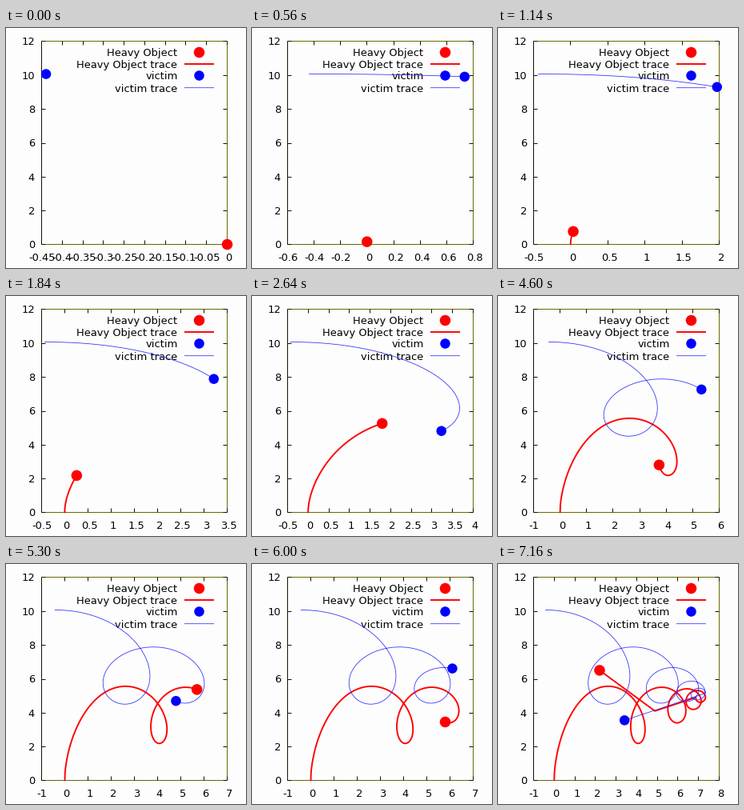
Animation of 300x300 px, one loop 7180 ms. Source, as a matplotlib script:

```python
import numpy as np
import matplotlib.pyplot as plt
from matplotlib.animation import FuncAnimation
from matplotlib.collections import LineCollection

SIZE, DPI = 300, 100
PX = 72 / DPI                      # points per pixel
LEFT, RIGHT, TOP, BOTTOM = 44.5, 276.5, 16.5, 270.5
TICK = 5
RED, BLUE, TRACE = "#ff0000", "#0000ff", "#3030ff"
INK, EDGE = "#141400", "#6a6a00"

STEPS, SUB = 154, 10               # simulation steps, trace points per step
MU = 0.0636
# Alternating far and near distances of each body from the common centre
APSIDES = np.array([5.035, .528, 2.852, .47, 1.64, .38, .84, .28, .42, .15, .3])
TILT = np.radians([2.5, 2.5, 3.4, 4, 6, 6, 6, 6, 6, 6, 6])


def orbit(t):
    """Decaying orbit built from half Kepler ellipses, clockwise."""
    first, last = APSIDES[:-1], APSIDES[1:]
    axis = (first + last) / 2
    ecc = abs(first - last) / (first + last)
    span = np.pi * np.sqrt(axis**3 / MU)
    start = np.concatenate([[0], np.cumsum(span)[:-1]])

    i = np.searchsorted(start, t, side="right") - 1
    a, e = axis[i], ecc[i]
    s = np.clip((t - start[i]) / span[i], 0, 1)
    falling = i % 2 == 0
    mean = np.pi * np.where(falling, 1 - s, s)
    E = np.full_like(t, np.pi)
    for _ in range(30):
        E -= (E - e * np.sin(E) - mean) / (1 - e * np.cos(E))
    r = a * (1 - e * np.cos(E))
    nu = 2 * np.arctan2(np.sqrt(1 + e) * np.sin(E / 2),
                        np.sqrt(1 - e) * np.cos(E / 2))
    turn = np.where(falling, np.pi - nu, nu)
    tilt = TILT[i] + (TILT[i + 1] - TILT[i]) * turn / np.pi
    angle = np.pi * i + turn - tilt
    return np.column_stack([r * np.sin(angle), r * np.cos(angle)])


t = np.arange((STEPS - 1) * SUB + 1) / SUB
# The centre drifts right and slows a little
centre = np.column_stack([-.2196 + .0489 * t - 4.4e-8 * t**3,
                          np.full_like(t, 5.03)])
q = orbit(t)
# The close encounter flings both bodies out in the last step
heavy = np.vstack([centre - q, [[4.88, 4.1], [2.2, 6.5]]])
victim = np.vstack([centre + q, [[5.2, 4.27], [3.41, 3.55]]])


def auto_range(lo, hi):
    width = hi - lo
    power = 10 ** np.floor(np.log10(width))
    room = 20 * power / width
    for limit, unit in ((40, .05), (20, .1), (10, .2), (4, .5), (1, 1)):
        if room > limit:
            break
    step = unit * power
    first = int(np.floor(lo / step + 1e-9))
    last = int(np.ceil(hi / step - 1e-9))
    return np.arange(first, last + 1) * step


def y_px(y):
    return BOTTOM - y * (BOTTOM - TOP) / 12


plt.rcParams["font.family"] = "DejaVu Sans"
plt.rcParams["path.snap"] = False
fig = plt.figure(figsize=(SIZE / DPI, SIZE / DPI), dpi=DPI, facecolor="#fdfdfd")
ax = fig.add_axes([0, 0, 1, 1])
ax.set(xlim=(0, SIZE), ylim=(SIZE, 0))
ax.axis("off")


def label(x, y, s="", ha="right"):
    return ax.text(x, y, s, ha=ha, va="baseline", size=13 * PX, color="black")


def line(x, y, color, width, z=3):
    return ax.plot(x, y, color=color, lw=width * PX, zorder=z,
                   solid_capstyle="butt", solid_joinstyle="round")[0]


def dot(x, y, color, size, z=4):
    return ax.add_patch(plt.Circle((x, y), size / 2, fc=color, lw=0, zorder=z))


for xs, ys, c in (([LEFT, RIGHT], [TOP, TOP], EDGE),
                  ([LEFT, RIGHT], [BOTTOM, BOTTOM], EDGE),
                  ([RIGHT, RIGHT], [TOP, BOTTOM], EDGE),
                  ([LEFT, LEFT], [TOP, BOTTOM], INK)):
    line(xs, ys, c, 1, 1)
for v in range(0, 13, 2):
    y = round(y_px(v)) + .5 if 0 < v < 12 else y_px(v)
    line([LEFT, LEFT + TICK], [y, y], INK, 1, 1)
    line([RIGHT - TICK, RIGHT], [y, y], INK, 1, 1)
    label(36, y_px(v) + 4.7, str(v))

for y, name, color, size in ((30.5, "Heavy Object", RED, 13.5),
                             (45, "Heavy Object trace", RED, 0),
                             (59.5, "victim", BLUE, 12.5),
                             (74.7, "victim trace", TRACE, 0)):
    label(214.5, y + 4.9, name)
    if size:
        dot(241.5, y, color, size)
    else:
        line([223, 260], [y, y], color, 1.9 if color == RED else .8)

x_ticks = LineCollection([], colors=INK, linewidths=PX, zorder=1)
ax.add_collection(x_ticks, autolim=False)
x_labels = [label(0, 291, ha="center") for _ in range(15)]
heavy_trace = line([], [], RED, 1.9)
victim_trace = line([], [], TRACE, .8)
heavy_dot = dot(0, 0, RED, 13.5, 5)
victim_dot = dot(0, 0, BLUE, 12.5, 5)
ax.set(xlim=(0, SIZE), ylim=(SIZE, 0))


def step_at(tick):
    """Steps are held for 20, 100 and 20 ms in turn."""
    cycle, part = divmod(tick, 7)
    return 3 * cycle + (0 if part == 0 else 2 if part == 6 else 1)


def draw(tick):
    k = step_at(tick)
    n = len(heavy) if k == STEPS else k * SUB + 1
    xs = np.concatenate([heavy[:n, 0], victim[:n, 0]])
    ticks = auto_range(round(xs.min(), 2), round(xs.max(), 2))
    scale = (RIGHT - LEFT) / (ticks[-1] - ticks[0])

    def x_px(x):
        return LEFT + (x - ticks[0]) * scale

    segments = []
    for x in np.floor(x_px(ticks)) + .5:
        segments += [[(x, BOTTOM), (x, BOTTOM - TICK)], [(x, TOP), (x, TOP + TICK)]]
    x_ticks.set_segments(segments)
    for i, text in enumerate(x_labels):
        shown = i < len(ticks)
        text.set_visible(shown)
        if shown:
            # Unsigned numbers keep a blank in place of the sign
            blank = 2 if ticks[i] >= 0 else 0
            text.set_x(x_px(ticks[i]) + .2 + blank)
            text.set_text(f"{round(ticks[i], 2):g}")

    for path, trace, mark in ((heavy, heavy_trace, heavy_dot),
                              (victim, victim_trace, victim_dot)):
        px, py = x_px(path[:n, 0]), y_px(path[:n, 1])
        trace.set_data(px, py)
        mark.center = px[-1], py[-1]
    return []


anim = FuncAnimation(fig, draw, frames=359, interval=20,
                     init_func=lambda: draw(0), repeat=True, blit=False)
plt.show()
```
